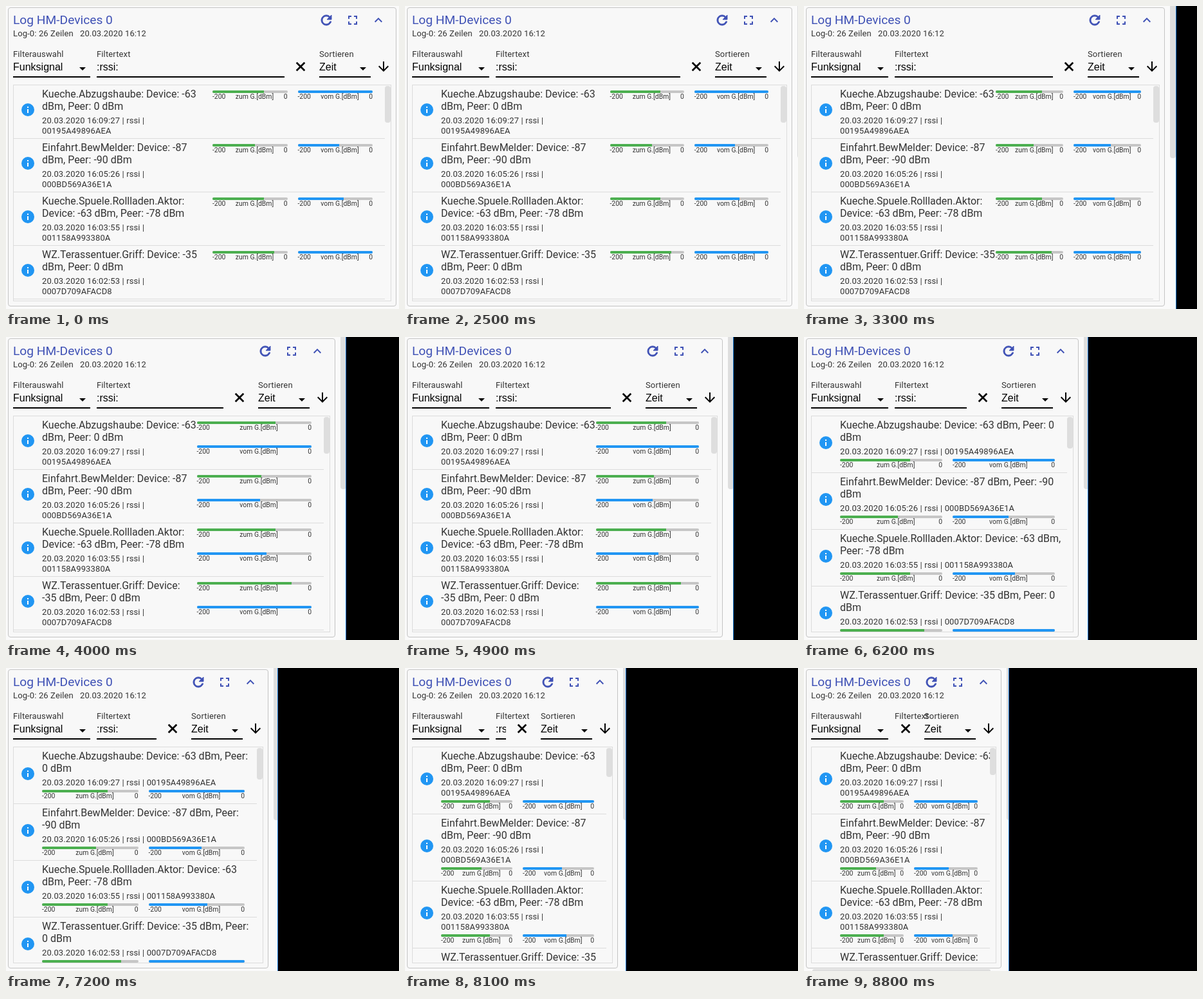
An HTML page that plays this animation: 611 by 470 pixels, repeating every 8.9 s.

```html
<!DOCTYPE html>
<html lang="de">
<head>
<meta charset="utf-8">
<title>Log HM-Devices</title>
<style>
  html, body { margin: 0; width: 100%; height: 100%; overflow: hidden; background: #fafafa; }
  body { position: relative; font: 16px/19px Roboto, sans-serif; color: #333; }
  body div, body svg { position: absolute; box-sizing: border-box; white-space: nowrap; }
  #app { left: 0; top: 0; width: var(--r); height: 470px; }
  .card { left: 3px; top: 2px; right: 0; height: 464px; background: #f8f8f8; border: 1px solid #c4c4c4; border-radius: 4px; }
  .title { left: 11px; top: 10px; font-size: 19.2px; line-height: 23px; color: #3f51b5; }
  .small { font-size: 13px; line-height: 16px; letter-spacing: .13px; }
  .field { top: 67px; height: 44px; }
  .value { left: 0; right: 0; top: 18px; height: 26px; overflow: hidden; border-bottom: 2px solid #000;
    font: 16px/20px "Liberation Sans", Arial, sans-serif; color: #000; }
  .caret::after { content: ""; position: absolute; right: 7px; top: 10px; border: 5px solid transparent; border-top-color: #000; border-bottom: 0; }
  .icon { width: 24px; height: 24px; fill: none; stroke: #3f51b5; stroke-width: 2; }
  .dark { stroke: #000; }
  .list { left: 11px; top: 122px; right: 8px; height: 336px; border: 1px solid #dcdcdc; overflow: hidden; }
  .rows { left: 0; right: 9px; top: 0; height: 334px; overflow: hidden; }
  .rows .row { position: relative; display: flex; flex-wrap: wrap; padding: 4px 0 3px 44px; border-bottom: 1px solid #dcdcdc; }
  .row > svg { left: 10px; top: calc(50% - 15px); width: 24px; height: 24px; }
  .row .text { position: relative; flex: none; width: var(--text); white-space: normal; }
  .row .text p { margin: 0; }
  .row .text .small { margin-top: 5px; }
  .row .meters { position: relative; flex: none; width: var(--meters); display: flex; flex-wrap: wrap; align-content: flex-start; padding-top: var(--lift); }
  .row .meter { position: relative; width: var(--meter); height: var(--step); padding: 3px 16px 0 0; }
  .meter .track { position: relative; height: 4px; border-radius: 2px; background: #c6c6c6; overflow: hidden; }
  .track div { left: 0; top: 0; height: 4px; }
  .meter .scale { position: relative; display: flex; justify-content: space-between; font-size: 10.4px; line-height: 12px; }
  .thumb { right: 0; top: 1px; width: 9px; background: #dedede; border-radius: 4px; }
  #pageBar { top: 0; width: 9px; height: 236px; background: #dedede; border-radius: 0 0 4px 4px; }
  #bottomBar { left: 13px; right: 17px; top: 467px; height: 3px; background: #dedede; border-radius: 3px 3px 0 0; }
  #desktop { top: 0; width: 700px; height: 470px; background: #000; border-left: 1px solid #1478d4; }
</style>
</head>
<body>
<div id="app">
  <div class="card"></div>
  <div class="title">Log HM-Devices 0</div>
  <div class="small" style="left:11px;top:35px">Log-0: 26 Zeilen</div>
  <div class="small" style="left:115px;top:35px">20.03.2020 16:12</div>

  <svg class="icon" style="right:97px;top:10px" viewBox="0 0 24 24"><path fill="#3f51b5" stroke-width=".9" d="M17.65 6.35C16.2 4.9 14.21 4 12 4c-4.42 0-7.99 3.58-7.99 8s3.57 8 7.99 8c3.73 0 6.84-2.55 7.73-6h-2.08c-.82 2.33-3.04 4-5.65 4-3.31 0-6-2.69-6-6s2.69-6 6-6c1.66 0 3.14.69 4.22 1.78L13 11h7V4z"/></svg>
  <svg class="icon" style="right:56px;top:10px" viewBox="0 0 24 24"><path d="M6 10V6h4M14 6h4v4M18 14v4h-4M10 18H6v-4"/></svg>
  <svg class="icon" style="right:16px;top:10px" viewBox="0 0 24 24"><path d="M6.7 14.7 12 9.4l5.3 5.3"/></svg>

  <div class="field" style="left:11px;width:120px">
    <div class="small">Filterauswahl</div><div class="value caret">Funksignal</div>
  </div>
  <div class="field" style="left:141px;right:174px">
    <div class="small">Filtertext</div><div class="value" id="filter">:rssi:</div>
  </div>
  <svg class="icon dark" style="right:137px;top:82px" viewBox="0 0 24 24"><path stroke-width="2.7" d="m5.7 5.7 12.6 12.6M18.3 5.7 5.7 18.3"/></svg>
  <div class="field" style="right:40px;width:80px">
    <div class="small">Sortieren</div><div class="value caret">Zeit</div>
  </div>
  <svg class="icon dark" style="right:8px;top:82px" viewBox="0 0 24 24"><path d="M12 4v14.5M4.7 11.3 12 18.6l7.3-7.3"/></svg>

  <div class="list"><div class="rows" id="rows"></div><div class="thumb" id="thumb"></div></div>
  <div id="bottomBar"></div>
</div>
<div id="pageBar"></div>
<div id="desktop"></div>

<script>
  const LOOP = 8900, START = 607;
  // Drag runs: first change in ms, number of 100 ms steps, card edge reached
  const runs = [
    [2500, 1, 602], [2600, 4, 585], [3100, 9, 513], [4000, 1, 512], [4400, 3, 499],
    [4800, 3, 492], [5300, 4, 451], [5700, 5, 430], [6200, 3, 421], [6700, 6, 408],
    [7300, 3, 392], [7600, 6, 331], [8200, 3, 317], [8500, 4, 307],
  ];
  const devices = [
    ["Kueche.Abzugshaube", -63, 0, "16:09:27", "00195A49896AEA"],
    ["Einfahrt.BewMelder", -87, -90, "16:05:26", "000BD569A36E1A"],
    ["Kueche.Spuele.Rollladen.Aktor", -63, -78, "16:03:55", "001158A993380A"],
    ["WZ.Terassentuer.Griff", -35, 0, "16:02:53", "0007D709AFACD8"],
  ];
  const $ = id => document.getElementById(id);

  const meter = (label, dbm, color) => `
    <div class="meter">
      <div class="track"><div style="width:${(200 + dbm) / 2}%;background:${color}"></div></div>
      <div class="scale"><span>-200</span><span>${label} G.[dBm]</span><span>0</span></div>
    </div>`;

  // Non-breaking hyphens would change the glyph, so each value stays in a nowrap span
  const value = dbm => `<span style="white-space:nowrap">${dbm}</span>`;

  $("rows").innerHTML = devices.map(([name, device, peer, time, serial]) => `
    <div class="row">
      <svg viewBox="0 0 24 24"><circle cx="12" cy="12" r="10" fill="#2196f3"/><path fill="#fff" d="M11 7h2v2h-2zM11 11h2v6h-2z"/></svg>
      <div class="text">
        <p>${name}: Device: ${value(device)} dBm, Peer: ${value(peer)} dBm</p>
        <p class="small">20.03.2020 ${time} | rssi | ${serial}</p>
      </div>
      <div class="meters">${meter("zum", device, "#4caf50")}${meter("vom", peer, "#2196f3")}</div>
    </div>`).join("");

  function edgeAt(time) {
    let edge = START;
    for (const [start, steps, end] of runs) {
      if (time < start) break;
      const done = Math.min(steps, Math.floor((time - start) / 100) + 1);
      edge += (end - edge) * done / steps;
    }
    return Math.round(edge);
  }

  function layout(edge) {
    const width = edge - 77, minText = 240.5, minMeter = 112;
    const below = width < 240 + minMeter;
    const text = Math.max(minText, below ? width : width / 2);
    const meters = below ? width : width - text;
    const stacked = meters < 2 * minMeter;
    const vars = {
      r: edge, text, meters,
      meter: stacked ? meters : meters / 2,
      step: stacked ? 37 : 21,
      lift: below ? 0 : 1,
    };
    for (const key in vars) $("app").style.setProperty("--" + key, vars[key] + "px");

    const windowEdge = edge + Math.round(12.4 + (edge - 307) * 0.023);
    $("pageBar").style.left = edge + 8 + "px";
    $("desktop").style.left = windowEdge - 1 + "px";
    $("filter").style.display = edge > 315 ? "" : "none";
    $("bottomBar").style.display = edge < 316 ? "" : "none";
    $("thumb").style.height = (!below ? 57 : edge > 346 ? 49 : edge > 316 ? 45 : 42) + "px";
  }

  let current;
  function frame() {
    const edge = edgeAt(performance.now() % LOOP);
    if (edge !== current) layout(current = edge);
    requestAnimationFrame(frame);
  }
  frame();
</script>
</body>
</html>
```
